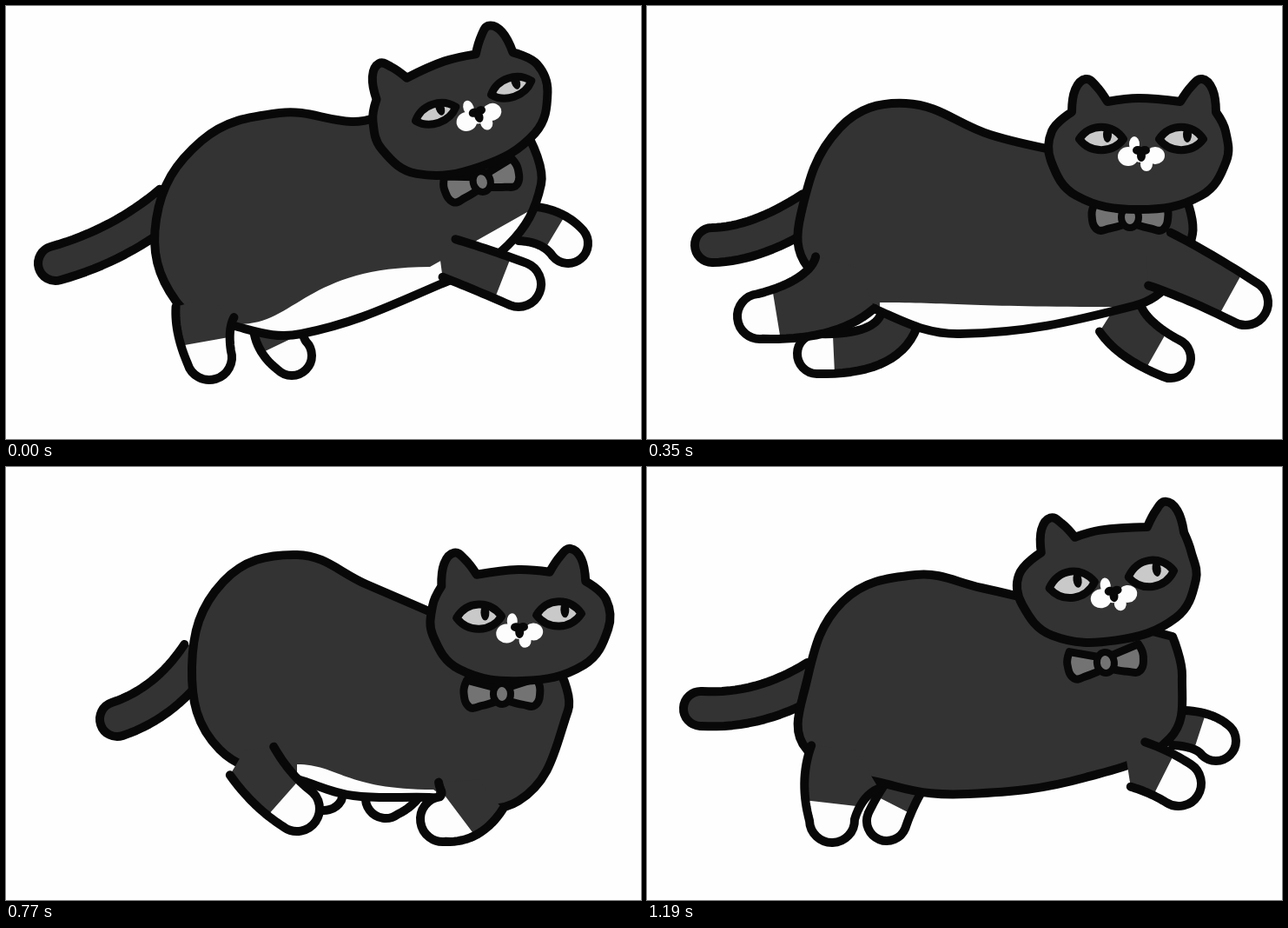
Animation of 731 by 498 pixels, one loop 1260 ms. Source, as an HTML page with a canvas:

```html
<!DOCTYPE html>
<html lang="en">
<head>
<meta charset="utf-8">
<title>Running cat</title>
<style>
html, body { margin: 0; width: 100%; height: 100%; overflow: hidden; background: #fefefe; }
canvas { display: block; }
</style>
</head>
<body>
<canvas id="stage" width="731" height="498"></canvas>
<script>
const ctx = document.getElementById('stage').getContext('2d');
const LOOP = 1260, STEP = 70, EASE = 0.7;
const PAPER = '#fefefe', INK = '#080808', FUR = '#333', WHITE = '#fdfdfd', BOW = '#737373', IRIS = '#c9c9c9';
const NEAR_PAW = 26, FAR_PAW = 23, TAIL_TIP = 20, SOCK = 20;

// Key poses of the rig.
// trunk: neck, saddle, rump, seat, hip, crotch, belly, elbow, chest
// limbs: root x,y, bend x,y, tip x,y, root radius
// belly: edge of the white patch from crotch to elbow, then on to the chest
// head: x,y, tilt; look: ear shift, face x,y, lid opening; bow: x,y
const poses = [
  {
    at: 0,
    trunk: [428,128, 398,133, 315,123, 225,155, 173,245, 196,340, 263,368, 340,377, 500,320, 578,275, 616,205, 604,155],
    hind: [229,352, 225,374, 234,404, 34], fore: [510,290, 545,302, 590,320, 23],
    farHind: [315,365, 312,385, 329,402, 31], farFore: [590,250, 628,250, 647,273, 20],
    tail: [190,226, 132,275, 57,296, 20], belly: [268,366, 488,300, 600,237],
    head: [526,126,-19], look: [-5,17,4,11], bow: [548,203]
  },
  {
    at: 210,
    trunk: [445,144, 390,140, 305,133, 220,160, 178,245, 187,315, 250,366, 330,380, 545,308, 607,262, 613,225, 604,195],
    hind: [206,320, 155,350, 124,401, 58], fore: [580,280, 630,285, 667,313, 34],
    farHind: [259,375, 259,390, 260,409, 27], farFore: [615,235, 660,238, 686,259, 20],
    tail: [195,228, 130,273, 65,297, 20], belly: [257,363, 535,308, 540,308],
    head: [542,148,2], look: [7,13,-1,13], bow: [548,216]
  },
  {
    at: 350,
    trunk: [470,166, 395,148, 298,112, 222,140, 177,240, 185,300, 266,350, 360,377, 560,345, 605,315, 628,262, 622,225],
    hind: [228,318, 200,350, 130,357, 45], fore: [590,291, 635,310, 689,341, 33],
    farHind: [290,362, 275,402, 196,400, 22], farFore: [545,360, 560,385, 603,405, 28],
    tail: [190,233, 127,274, 75,275, 20], belly: [268,341, 545,346, 550,350],
    head: [566,172,0], look: [6,3,-3,13], bow: [556,244]
  },
  {
    at: 490,
    trunk: [487,180, 400,136, 313,93, 240,130, 192,240, 212,300, 298,337, 370,363, 530,370, 612,335, 632,265, 628,240],
    hind: [250,322, 218,350, 160,320, 45], fore: [590,345, 615,385, 656,406, 45],
    farHind: [300,350, 285,372, 245,366, 25], farFore: [520,365, 522,385, 533,408, 34],
    tail: [205,225, 131,268, 93,254, 20], belly: [300,329, 515,362, 520,364],
    head: [581,184,6], look: [7,8,-1,0], bow: [558,252]
  },
  {
    at: 770,
    trunk: [487,166, 415,135, 335,101, 250,132, 214,230, 246,325, 345,362, 400,378, 487,380, 590,384, 647,280, 640,240],
    hind: [283,338, 305,372, 335,393, 30], fore: [535,378, 525,402, 503,405, 40],
    farHind: [372,355, 370,365, 366,372, 18], farFore: [450,365, 445,375, 437,381, 30],
    tail: [222,215, 185,271, 128,290, 20], belly: [335,342, 492,371, 495,373],
    head: [592,184,-2], look: [-6,-1,3,14], bow: [571,262]
  },
  {
    at: 980,
    trunk: [497,156, 450,154, 340,127, 245,162, 210,255, 243,352, 318,372, 400,385, 500,372, 585,372, 636,265, 632,240],
    hind: [275,360, 288,380, 299,408, 30], fore: [545,366, 530,390, 505,395, 38],
    farHind: [330,375, 355,400, 395,400, 22], farFore: [618,325, 625,345, 619,369, 25],
    tail: [222,222, 145,289, 87,291, 20], belly: [316,360, 508,359, 510,362],
    head: [591,179,-5], look: [3,7,8,15], bow: [573,258]
  },
  {
    at: 1190,
    trunk: [428,149, 385,139, 310,124, 225,155, 183,250, 184,325, 285,367, 370,376, 505,357, 602,312, 616,240, 605,195],
    hind: [228,345, 212,370, 213,406, 46], fore: [565,342, 590,350, 612,364, 27],
    farHind: [298,365, 285,385, 276,407, 20], farFore: [605,300, 640,300, 655,315, 20],
    tail: [195,242, 131,282, 62,278, 20], belly: [285,395, 505,388, 510,388],
    head: [531,138,-8], look: [12,5,8,15], bow: [528,226]
  }
];

const key = i => poses[(i + poses.length) % poses.length];
const timeOf = i => key(i).at + LOOP * Math.floor(i / poses.length);

// Smooth cyclic blend between the neighbouring poses.
function poseAt(t) {
  let i = poses.length - 1;
  while (poses[i].at > t) i--;
  const near = [i - 1, i, i + 1, i + 2];
  const [ta, tb, tc, td] = near.map(timeOf);
  const span = tc - tb, u = (t - tb) / span;
  const s = u * u * (3 - 2 * u), m0 = u * (1 - u) * (1 - u), m1 = u * u * (u - 1);
  const out = {};
  for (const part in poses[0]) {
    if (part === 'at') continue;
    const [a, b, c, d] = near.map(k => key(k)[part]);
    out[part] = b.map((v, n) => {
      const v0 = EASE * span * (c[n] - a[n]) / (tc - ta);
      const v1 = EASE * span * (d[n] - v) / (td - tb);
      return v + (c[n] - v) * s + v0 * m0 + v1 * m1;
    });
  }
  return out;
}

const pairs = a => Array.from({ length: a.length / 2 }, (_, i) => [a[2 * i], a[2 * i + 1]]);

// Closed smooth curve through points, sharp at the given corners.
function loop(pts, corners) {
  const n = pts.length, path = new Path2D();
  const dir = i => {
    if (corners.includes(i)) return [0, 0];
    const p = pts[(i + n - 1) % n], q = pts[(i + 1) % n];
    const len = Math.hypot(q[0] - p[0], q[1] - p[1]) || 1;
    return [(q[0] - p[0]) / len, (q[1] - p[1]) / len];
  };
  path.moveTo(...pts[0]);
  for (let i = 0; i < n; i++) {
    const j = (i + 1) % n, a = pts[i], b = pts[j], da = dir(i), db = dir(j);
    const h = Math.hypot(b[0] - a[0], b[1] - a[1]) * 0.38;
    path.bezierCurveTo(a[0] + da[0] * h, a[1] + da[1] * h, b[0] - db[0] * h, b[1] - db[1] * h, b[0], b[1]);
  }
  path.closePath();
  return path;
}

function fill(path, color) {
  ctx.fillStyle = color;
  ctx.fill(path);
}

function ink(path, width = 10) {
  ctx.lineWidth = width;
  ctx.strokeStyle = INK;
  ctx.stroke(path);
}

function within(clip, draw) {
  ctx.save();
  ctx.clip(clip);
  draw();
  ctx.restore();
}

function placed(x, y, deg, draw) {
  ctx.save();
  ctx.translate(x, y);
  ctx.rotate(deg * Math.PI / 180);
  draw();
  ctx.restore();
}

function oval(x, y, rx, ry, color) {
  ctx.fillStyle = color;
  ctx.beginPath();
  ctx.ellipse(x, y, rx, ry, 0, 0, 7);
  ctx.fill();
}

// Tapered outline along a bent bone, open at the root and round at the tip.
function limbPath([x0, y0, x1, y1, x2, y2, root], tip, from = 0) {
  const N = 16, path = new Path2D(), back = [];
  let angle;
  for (let i = 0; i <= N; i++) {
    const s = from + (1 - from) * i / N, q = 1 - s, r = tip + (root - tip) * q;
    const x = q * q * x0 + 2 * q * s * x1 + s * s * x2;
    const y = q * q * y0 + 2 * q * s * y1 + s * s * y2;
    angle = Math.atan2(q * (y1 - y0) + s * (y2 - y1), q * (x1 - x0) + s * (x2 - x1));
    const nx = r * Math.sin(angle), ny = -r * Math.cos(angle);
    path.lineTo(x + nx, y + ny);
    back.unshift([x - nx, y - ny]);
  }
  path.arc(x2, y2, tip, angle - Math.PI / 2, angle + Math.PI / 2);
  for (const p of back) path.lineTo(...p);
  return path;
}

function limb(bone, tip, socked = true) {
  const [x0, y0, x1, y1, x2, y2, root] = bone;
  const outline = limbPath(bone, tip), flesh = new Path2D(outline);
  const k = 0.5 * root / (Math.hypot(x1 - x0, y1 - y0) || 1);
  flesh.lineTo(x0 - (x1 - x0) * k, y0 - (y1 - y0) * k);
  fill(flesh, FUR);
  if (socked) {
    const from = 1 - SOCK / (2 * Math.hypot(x2 - x1, y2 - y1) || 1);
    fill(limbPath(bone, tip, Math.max(0, from)), WHITE);
  }
  ink(outline);
}

function drawTrunk(p) {
  const pts = pairs(p.trunk), trunk = loop(pts, [0, pts.length - 1]);
  const [x1, y1, x2, y2, x3, y3] = p.belly, dx = x2 - x1;
  const patch = new Path2D();
  patch.moveTo(x1, y1);
  patch.bezierCurveTo(x1 + dx * 0.3, y1, x1 + dx * 0.35, y2, x2, y2);
  patch.lineTo(x3, y3);
  patch.lineTo(x3, y3 + 100);
  patch.lineTo(x1, y1 + 100);
  fill(trunk, FUR);
  within(trunk, () => fill(patch, WHITE));
  ink(trunk);
}

function drawBow(x, y, deg) {
  placed(x, y, deg, () => {
    for (const s of [-1, 1]) {
      const wing = loop([[6, -8], [40, -18], [44, -4], [38, 13], [24, 12], [6, 7]].map(([u, v]) => [u * s, v]), [0, 1, 5]);
      fill(wing, BOW);
      ink(wing, 9);
    }
    const knot = new Path2D();
    knot.ellipse(0, -1, 10, 12, 0, 0, 7);
    fill(knot, BOW);
    ink(knot, 8);
  });
}

function drawEye(x, y, open) {
  const h = Math.max(0, open), w = 19 + h / 2, sag = Math.max(0, 8 - h);
  placed(x, y, 0, () => {
    const eye = new Path2D(), top = sag - 1.4 * h, low = Math.max(8, 1.3 * h);
    eye.moveTo(-w, 0);
    eye.bezierCurveTo(-w / 2, top, w / 2, top, w, 0);
    eye.bezierCurveTo(w / 2, low, -w / 2, low, -w, 0);
    eye.closePath();
    fill(eye, IRIS);
    within(eye, () => oval(7, -5, 5, 9, INK));
    ink(eye, 9);
  });
}

function headOutline(shift) {
  const ear = [[42, -62], [55, -80], [67, -88], [79, -76], [83, -50]];
  const cheek = [[100, -28], [101, 6], [72, 46]];
  const side = s => [...ear.map(([x, y]) => [s * x + shift, y]), ...cheek.map(([x, y]) => [s * x, y])];
  return loop([[0, -66], ...side(1), [0, 62], ...side(-1).reverse()], [1, 5, 13, 17]);
}

function drawHead([x, y, deg], [earShift, faceX, faceY, open]) {
  placed(x, y, deg, () => {
    const head = headOutline(earShift);
    fill(head, FUR);
    ink(head);
    ctx.translate(faceX, faceY);
    for (const s of [-1, 1]) drawEye(46 * s, -16, open);
    oval(-15, 4, 12, 11, WHITE);
    oval(16, 3, 11, 10, WHITE);
    oval(6, 13, 7, 8, WHITE);
    oval(-8, -10, 6, 9, WHITE);
    oval(0, 4, 10, 7, WHITE);
    for (const s of [-1, 1]) oval(4 * s, -3, 6, 5, INK);
    oval(0, 3, 5, 7, INK);
  });
}

function render(t) {
  const p = poseAt(t);
  ctx.fillStyle = PAPER;
  ctx.fillRect(0, 0, 731, 498);
  ctx.lineCap = ctx.lineJoin = 'round';
  limb(p.tail, TAIL_TIP, false);
  limb(p.farHind, FAR_PAW);
  limb(p.farFore, FAR_PAW);
  drawTrunk(p);
  limb(p.hind, NEAR_PAW);
  limb(p.fore, NEAR_PAW);
  drawBow(...p.bow, p.head[2] * 0.8);
  drawHead(p.head, p.look);
}

const start = performance.now();
function tick() {
  const t = (performance.now() - start) % LOOP;
  render(Math.floor(t / STEP) * STEP);
  requestAnimationFrame(tick);
}
tick();
</script>
</body>
</html>
```
